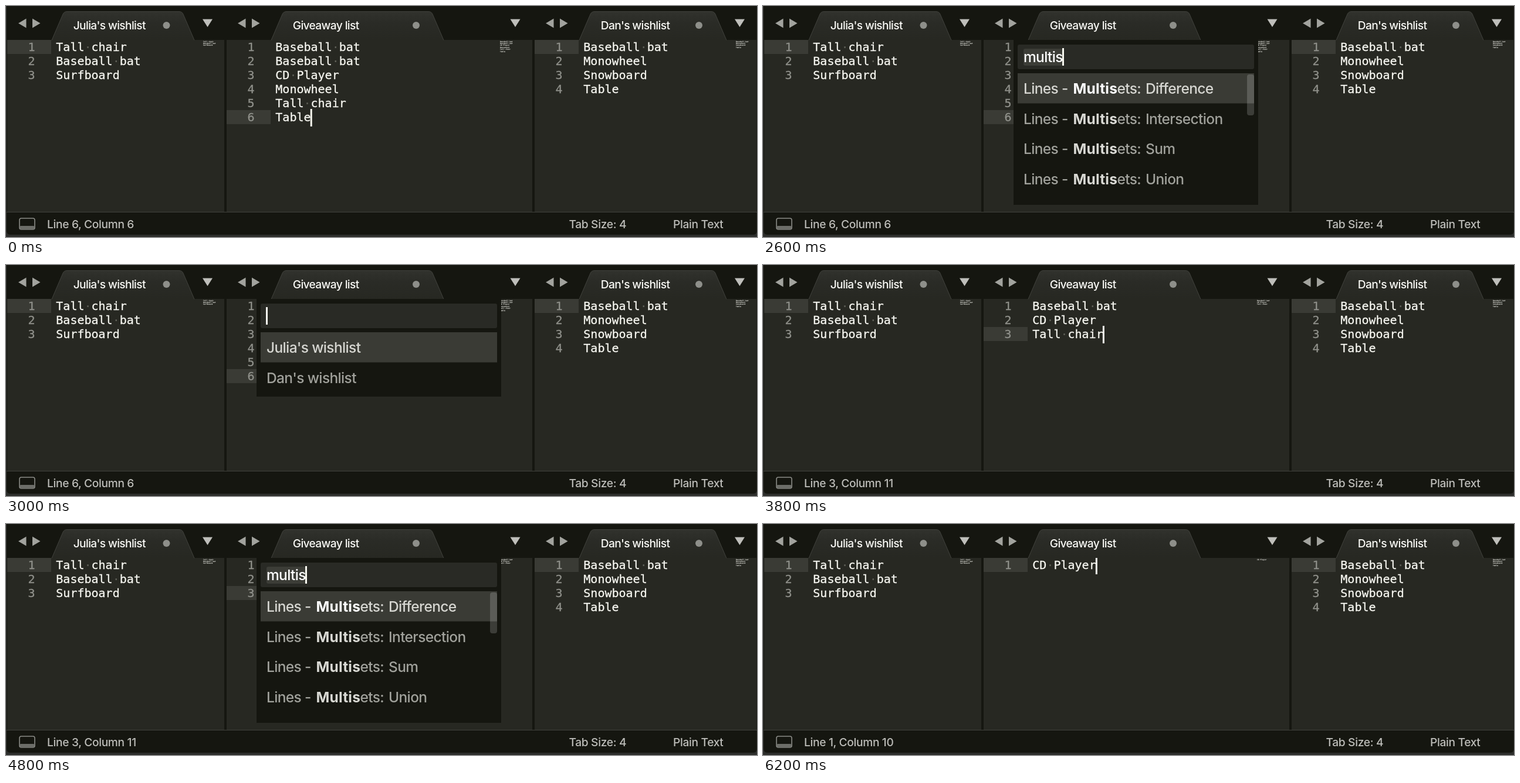
These frames come from a looping animation (1280x395 px, 8000 ms). An HTML page:

```html
<!DOCTYPE html>
<html lang="en">
<head>
<meta charset="utf-8">
<title>Multiset difference on lists</title>
<style>
  html, body { margin: 0; width: 100%; height: 100%; overflow: hidden; background: #2d2e2c; }
  svg { display: block; width: 1280px; height: 395px; }
  .ui { font: 500 19.2px Inter, Roboto, sans-serif; letter-spacing: -.018em; fill: #bdbdb9; }
  .title { letter-spacing: -.034em; fill: #f8f8f4; }
  .code { font: 20px "DejaVu Sans Mono", "Liberation Mono", monospace; fill: #f8f8f2; stroke: #f8f8f2; stroke-width: .3px; }
  .num { fill: #90918b; stroke: #90918b; }
  .code .dot { fill: #5d5e56; stroke: none; }
  .map { font: bold 3px "DejaVu Sans Mono", monospace; fill: #f0f0ea; }
  .pick { font: 500 24.5px Inter, Roboto, sans-serif; letter-spacing: -.026em; fill: #a0a19b; }
  .pick .hit { font-weight: 700; letter-spacing: .008em; fill: #d8d8d3; }
  .on { fill: #d6d6d1; }
  .on .hit, .query { fill: #fff; }
</style>
</head>
<body>
<svg viewBox="0 0 1280 395">
  <defs>
    <linearGradient id="tab" x1="0" y1="0" x2="0" y2="1">
      <stop offset="0" stop-color="#31322d"/>
      <stop offset=".4" stop-color="#2a2b26"/>
      <stop offset="1" stop-color="#272822"/>
    </linearGradient>
  </defs>
  <g id="frame"></g>
  <g id="scene"></g>
</svg>
<script>
const DARK = '#151610', EDITOR = '#272822', ACTIVE = '#3a3b35';
const TOP = 58, LINE = 24, CHAR = 12.04, LOOP = 8000;

const panes = [
  { x: 2, right: 372, tabEnd: 321, dot: 273.5, menu: 343.5, map: 336, title: "Julia's wishlist" },
  { x: 376, right: 897, tabEnd: 746, dot: 699, menu: 868, map: 842, title: 'Giveaway list' },
  { x: 901, right: 1279, tabEnd: 1228, dot: 1181, menu: 1250.5, map: 1244, title: "Dan's wishlist" }
];
const [first, middle, last] = panes;

const lists = {
  first: ['Tall chair', 'Baseball bat', 'Surfboard'],
  last: ['Baseball bat', 'Monowheel', 'Snowboard', 'Table'],
  full: ['Baseball bat', 'Baseball bat', 'CD Player', 'Monowheel', 'Tall chair', 'Table'],
  fewer: ['Baseball bat', 'CD Player', 'Tall chair'],
  one: ['CD Player']
};

// Each step: start time, middle list, palette kind, selected row
const steps = [
  [0, 'full'],
  [1800, 'full', 'commands', 1],
  [2600, 'full', 'commands', 0],
  [3000, 'full', 'files', 0],
  [3400, 'full', 'files', 1],
  [3800, 'fewer'],
  [4800, 'fewer', 'commands', 0],
  [5600, 'fewer', 'files', 0],
  [6200, 'one']
];

const rect = (x, y, w, h, fill, rx = 0) =>
  `<rect x="${x}" y="${y}" width="${w}" height="${h}" rx="${rx}" fill="${fill}"/>`;
const text = (x, y, cls, body) => `<text x="${x}" y="${y}" class="${cls}">${body}</text>`;
const shape = (d, fill) => `<path d="${d}" fill="${fill}"/>`;

function chrome(p) {
  const a = p.x + 76, b = p.tabEnd;
  return rect(p.x, TOP, p.right - p.x, 294, EDITOR) +
    `<path d="M${a} 58.5L${a + 19} 14Q${a + 21} 9.5 ${a + 26} 9.5H${b - 26}Q${b - 21} 9.5 ${b - 19} 14L${b} 58.5"
      fill="url(#tab)" stroke="#41423d"/>` +
    shape(`M${p.x + 19} 29.5l13.5-8v16z`, '#a2a39e') +
    shape(`M${p.x + 56.5} 29.5l-13.5-8v16z`, '#a2a39e') +
    shape(`M${p.menu - 8.5} 22.5h17l-8.5 13.5z`, '#bfbfbb') +
    `<circle cx="${p.dot}" cy="33" r="6" fill="#8e8f8a"/>` +
    text(p.x + 112.7, 40, 'ui title', p.title);
}

function listing(p, items, active) {
  const row = (item, i) => {
    const y = TOP + 19 + i * LINE;
    const dotted = item.replace(' ', '<tspan class="dot">·</tspan>');
    return text(p.x + 35.5, y, 'code num', i + 1) +
      text(p.x + 83.3, y, 'code', dotted) +
      text(p.map, 61.6 + i * 3.4, 'map', item);
  };
  return rect(p.x, TOP + (active - 1) * LINE, 75, LINE, ACTIVE) +
    items.map(row).join('');
}

function caret(items) {
  const n = items.length, y = TOP + (n - 1) * LINE;
  const top = Math.max(TOP, y - 2);
  const x = middle.x + 82.5 + items[n - 1].length * CHAR;
  return rect(x, top, 3, y + 28 - top, '#f8f8f0');
}

function palette(kind, selected) {
  const commands = kind === 'commands';
  const rows = commands
    ? ['Difference', 'Intersection', 'Sum', 'Union'].map(name =>
      `Lines -<tspan x="528.5" class="hit">Multis</tspan><tspan x="603.5">ets:</tspan><tspan x="652">${name}</tspan>`)
    : [first.title, last.title];
  let out = rect(427, TOP, 417, commands ? 282 : 167, DARK) +
    rect(434, 66, 403, 42, '#292a25', 3) +
    rect(434, 115 + selected * 51.5, 403, 51.5, ACTIVE);
  rows.forEach((body, i) => {
    out += text(444, 150 + i * 51.5, i === selected ? 'pick on' : 'pick', body);
  });
  if (!commands) return out + rect(443, 72, 3, 30, '#f8f8f0');
  return out + rect(444, 73, 67, 29, '#3c3d37', 3) +
    text(444, 96, 'pick query', 'multis') +
    rect(510, 72, 3, 30, '#f8f8f0') +
    rect(825, 117, 12, 70, 'rgba(255,255,255,.17)', 4);
}

function scene([, name, kind, selected]) {
  const items = lists[name], n = items.length;
  return listing(middle, items, n) +
    (kind ? palette(kind, selected) : caret(items)) +
    text(70, 380, 'ui', `Line ${n}, Column ${items[n - 1].length + 1}`);
}

document.getElementById('frame').innerHTML =
  rect(1, -8, 1279, 399, DARK, 6) +
  panes.map(chrome).join('') +
  listing(first, lists.first, 1) + listing(last, lists.last, 1) +
  rect(1, 352, 1279, 1, '#40413c') +
  '<rect x="23" y="363" width="26" height="19" rx="3" fill="none" stroke="#8b8c87" stroke-width="1.6"/>' +
  rect(24, 376, 24, 6, '#6c6d68', 1) +
  text(959.5, 380, 'ui', 'Tab Size: 4') + text(1137, 380, 'ui', 'Plain Text');

const stage = document.getElementById('scene');
const scenes = steps.map(scene);
let shown = -1;

function draw() {
  const t = performance.now() % LOOP;
  let i = steps.length - 1;
  while (steps[i][0] > t) i--;
  if (i !== shown) stage.innerHTML = scenes[shown = i];
  requestAnimationFrame(draw);
}
draw();
</script>
</body>
</html>
```
